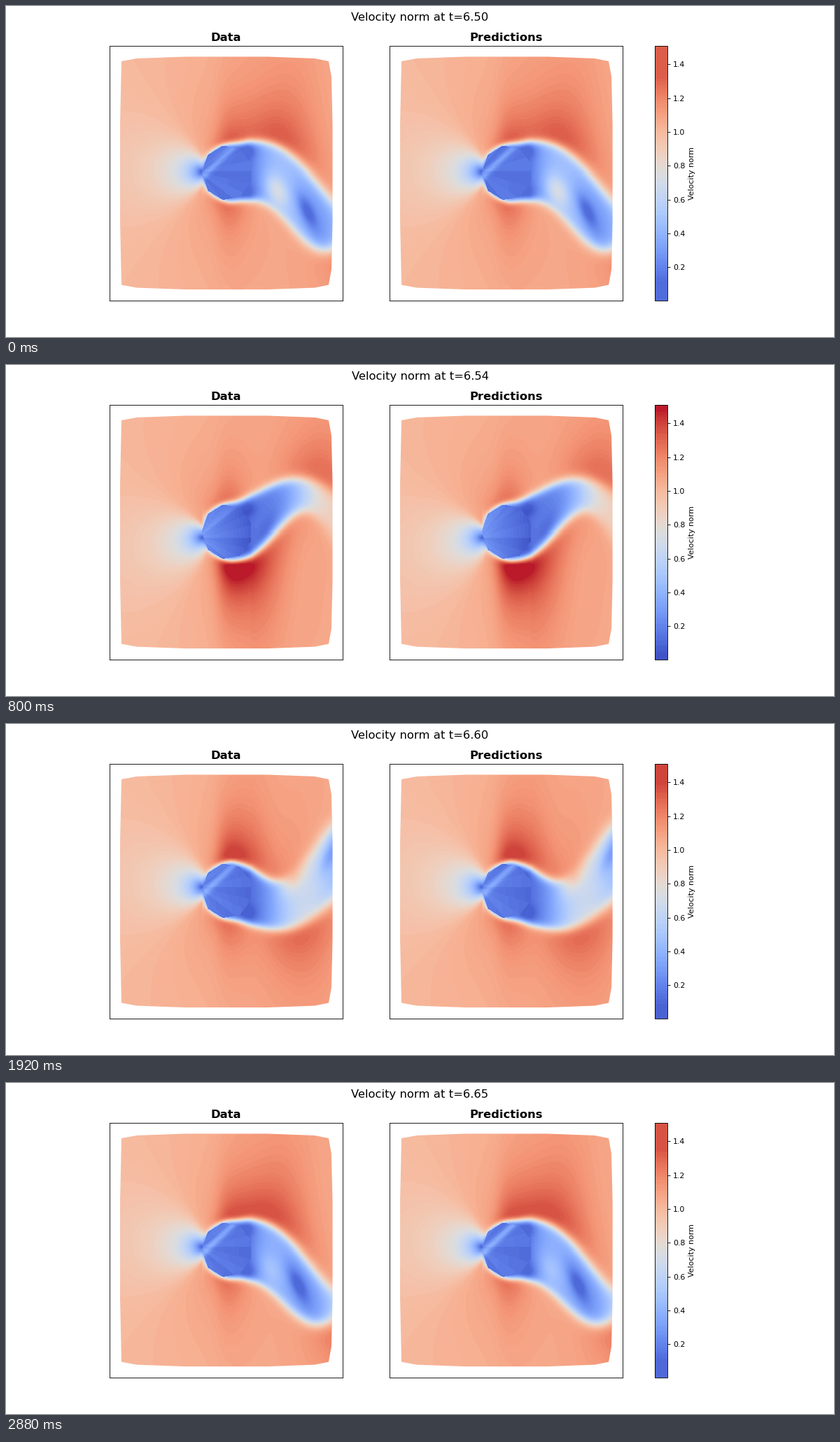
A matplotlib script that plays this animation: 1183x473 px, repeating every 3040 ms.

```python
import numpy as np
import matplotlib.pyplot as plt
from matplotlib.animation import FuncAnimation
from matplotlib.patches import Polygon
from matplotlib.path import Path

W, H = 1183, 473
DPI = W / 15
FRAMES, STEP = 19, 160
HALF = FRAMES / 2          # the flow mirrors itself every half period
MID = 238.8                # mirror axis of the channel
BAND = 0.015               # contour spacing
VMIN, VMAX = 0.003, 1.51

# Upper side of the channel, mirrored to give the lower side
RIM = [(163, 170), (165, 79), (187, 75), (256, 72.5), (374, 72.5), (441, 75),
       (461, 79), (465, 101), (466.6, 170)]
OUTLINE = RIM + [(x, 2 * MID - y) for x, y in reversed(RIM)]
CORNERS = np.pi + np.arange(9) * 2 * np.pi / 9
BODY = np.c_[316 + 36 * np.cos(CORNERS), MID + 39 * np.sin(CORNERS)]

px, py = np.meshgrid(np.arange(148, 481) + .5, np.arange(57, 421) + .5)
x, y = px[0], py - MID
z = (px - 315) + 1j * y
inside = Path(BODY).contains_points(np.c_[px.ravel(), py.ravel()]).reshape(px.shape)


def turn(n):
    return 2 * np.pi * n / FRAMES


def step(v):
    return 0.5 * (1 + np.tanh(v / 2))


def ramp(v, start, end):
    return np.clip((v - start) / (end - start), 0, 1)


def bell(v, width):
    return np.exp(-(v / width) ** 2)


def edge(n):
    """Upper wake edge: a skewed wave that grows and lags downstream."""
    nose = np.sqrt(np.maximum(1 - ((np.minimum(x, 325) - 325) / 45) ** 2, 0))
    height = 41 * nose - .13 * np.maximum(x - 350, 0)
    s = ramp(x, 318, 467)
    phase = turn(n - 5.7 - .042 * (x - 360))
    phase = phase + .45 * (1 - np.cos(phase))
    return -height - 84 * s * s * (3 - 2 * s) * np.cos(phase)


def jet(n):
    """Extra speed above that edge: a bump born at the body and swept away."""
    q = (n + 8) % FRAMES - 8
    amp = (.24 + .16 * bell(q + 4, 4)) * step((q + 7.5) / .6) * step((10 - q) / .6)
    bump = amp * bell(x - 345 - 12 * max(q + 4, 0), 60)
    return (bump + .12 * bell(x - 315, 30)) * step((x - 302) / 6)


def blob(cx, cy, amp, sign, long, wide):
    dx, dy = px - cx, sign * y - cy
    return amp * bell(.42 * dx + .91 * dy, long) * bell(.91 * dx - .42 * dy, wide)


def wake_core(n):
    r = ramp(x, 345, 467) ** .7
    v = .1 + r * (.5 + .27 * np.cos(2 * turn(n - 2.6 - .06 * (x - 415))))
    for k, sign in ((0, 1), (HALF, -1)):
        q = (n + k + 6) % FRAMES - 6
        v = v + blob(387 + 9 * q, 25 - 2 * q, .4 * bell(q - 1.2, 2), sign, 24, 14)
        v = v + blob(430 + 13 * q, 55 - 1.9 * (q - .8) ** 2,
                     -.26 * bell(q, 4), sign, 27, 10)
        v = v - .1 * bell(np.hypot(px - 347, sign * y - 32), 12)
    return np.maximum(v, .04)


def body(n, swing, facet):
    """Flat facets seen across the obstacle."""
    angle = np.arctan2(y - 8 * swing, px - 276)
    fan = .02 * ((np.floor(angle / facet) * 7) % 3 - 1)
    shade_off = swing ** 2 * (.2 * (349 - px) / 68 - .09)
    ridge = .13 + .1 * np.cos(turn(n - 15.5))
    off = .69 * (px - 284) + .73 * (py - 236)
    return .15 + shade_off + fan + ridge * bell(off - 4, 5)


def speed(n, facet):
    swing = np.sin(turn(n - .5))

    # Free stream around the obstacle, slowed in front and faster at the sides
    lean = np.exp(1j * (np.angle(z) + 8 * swing / 36))
    flow = np.abs(1 - (36 / (np.maximum(np.abs(z), 35) * lean)) ** 2) - 1
    slow = (np.hypot(flow, .04) - flow) / 2
    out = (1.04 + .03 * step((px - 280) / 30) + .2 * (flow + slow)
           - slow ** .8 * step((330 - px) / 12))

    # Distances outwards from both wake edges
    top, low = edge(n), -edge(n + HALF)
    above = (top - y) / np.hypot(1, np.gradient(top))
    below = (y - low) / np.hypot(1, np.gradient(low))
    soft = 2 + 3.5 * ramp(px, 300, 467)

    upper = step(((top + low) / 2 - y) / (soft + 4))
    for side, dist, k in ((upper, above, 0), (1 - upper, below, HALF)):
        out = out + side * jet(n + k) / (1 + (np.maximum(dist, 0) / 55) ** 2)

    wake = step(-above / soft) * step(-below / soft) * step((px - 281) / 1.5)
    v = wake * wake_core(n) + (1 - wake) * out
    return np.where(inside, body(n, swing, facet), v)


def shade(v, n):
    """Contour bands, limited to the range of colours in use."""
    c = np.cos(2 * turn(n - .3))
    v = (np.floor(v / BAND) + .5) * BAND
    return np.clip(v, .075 + .045 * c, 1.405 - .075 * c)


# The tiny margin keeps the pixel size from rounding down
fig, axes = plt.subplots(1, 2, dpi=DPI,
                         figsize=((W + 1e-6) / DPI, (H + 1e-6) / DPI))
images = []
for ax, name in zip(axes, ("Data", "Predictions")):
    im = ax.imshow(np.ones(px.shape), cmap="coolwarm", vmin=VMIN, vmax=VMAX,
                   extent=(148, 481, 421, 57), aspect="auto",
                   interpolation="nearest")
    ax.set(xlim=(147.9, 481.3), ylim=(421, 56.8), xticks=[], yticks=[])
    im.set_clip_path(Polygon(OUTLINE, transform=ax.transData))
    ax.set_title(name, fontsize=15, fontweight="bold")
    images.append(im)

bar = fig.colorbar(images[0], ax=axes, ticks=np.arange(.2, 1.5, .2))
bar.set_label("Velocity norm")
bar_shape = bar.solids.get_array().shape
bar_values = np.linspace(VMIN, VMAX, bar.solids.get_array().size).reshape(bar_shape)
title = fig.suptitle("", fontsize=15)


def draw(n):
    for im, facet in zip(images, (.22, .29)):
        im.set_data(shade(speed(n, facet), n))
    bar.solids.set_array(shade(bar_values, n))
    title.set_text(f"Velocity norm at t={6.5 + .0086 * n:.2f}")
    return [*images, bar.solids, title]


anim = FuncAnimation(fig, draw, frames=FRAMES, init_func=lambda: draw(0),
                     interval=STEP, repeat=True, repeat_delay=0, blit=False)
plt.show()
```
